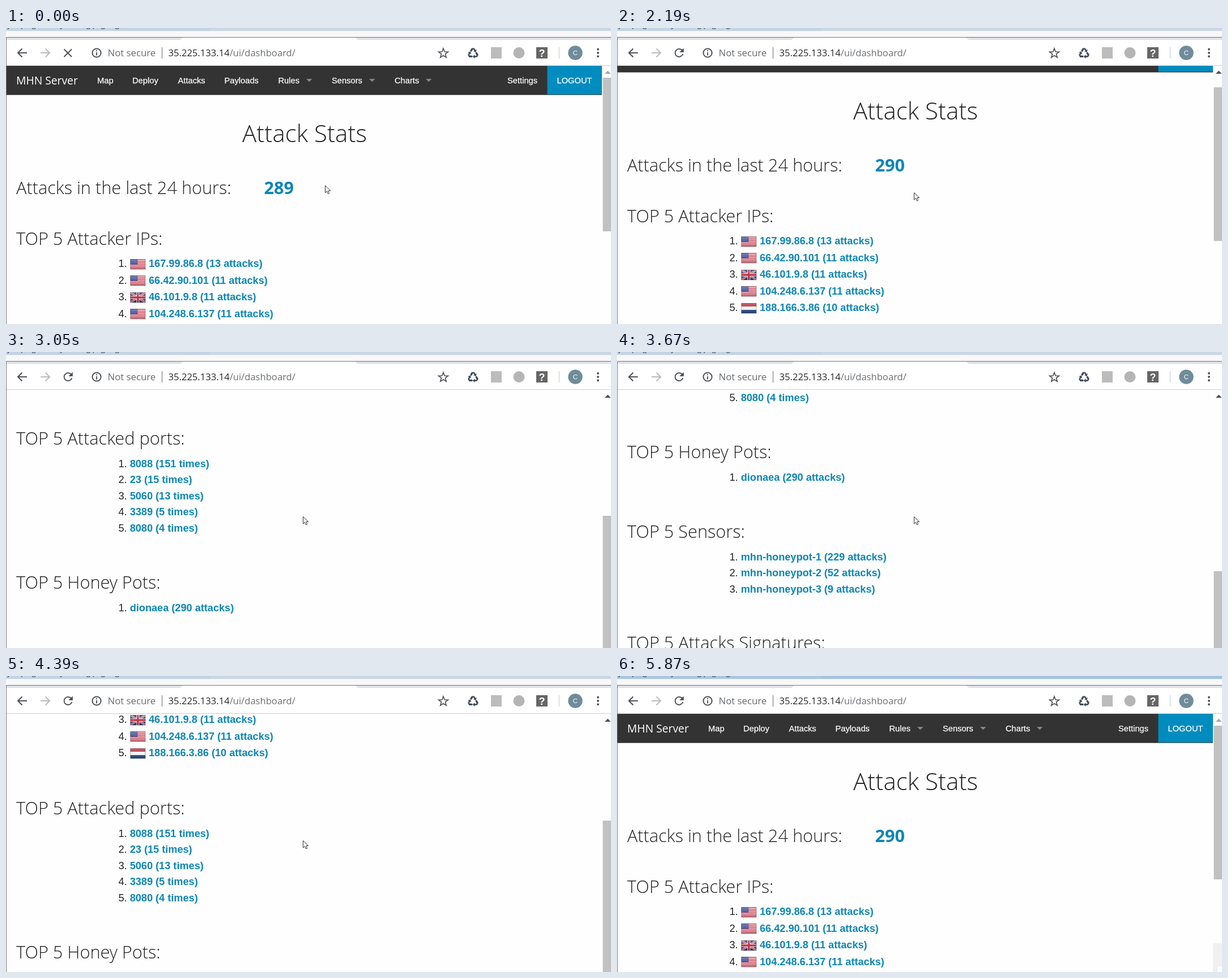
Animation, 1068 px wide and 524 px high, one loop 5.94 s. Source, as an HTML page:

```html
<!DOCTYPE html>
<html lang="en">
<head>
<meta charset="utf-8">
<title>Attack Stats</title>
<style>
  html, body { margin: 0; width: 100%; height: 100%; overflow: hidden; background: #fff; }
  svg { display: block; }
  text { white-space: pre; }
  .sans { font-family: "Liberation Sans", Arial, sans-serif; }
  .open { font-family: "Open Sans", "Noto Sans", sans-serif; }
  .nav { font-size: 14.7px; fill: #fff; stroke: #fff; stroke-width: .25; }
  .heading { font-size: 30.7px; font-weight: 300; fill: #222; }
  .item { font-size: 18.15px; fill: #222; }
  .link { font-weight: 700; fill: #0c86b6; }
  .line { fill: none; stroke: #4d5156; stroke-width: 2; }
</style>
</head>
<body>
<svg width="1068" height="524" viewBox="0 0 1068 524">
  <defs>
    <clipPath id="view"><rect x="1" y="67" width="1067" height="457"/></clipPath>
    <clipPath id="flagBox"><rect width="27" height="18"/></clipPath>
    <linearGradient id="gloss" x2="0" y2="1">
      <stop offset="0" stop-color="#fff" stop-opacity=".25"/>
      <stop offset=".5" stop-color="#fff" stop-opacity=".05"/>
      <stop offset="1" stop-color="#000" stop-opacity=".15"/>
    </linearGradient>
    <g id="us">
      <path d="M0 0H27V18H0Z" fill="#f3e2e4"/>
      <path d="M0 1.3H27M0 4.1H27M0 6.9H27M0 9.7H27M0 12.5H27M0 15.3H27M0 17.6H27" stroke="#d23c50" stroke-width="1.6"/>
      <path d="M0 0H13V9.5H0Z" fill="#334a94"/>
      <path d="M1.5 2.3H12M2.5 4.7H12M1.5 7.1H12" stroke="#a3afd6" stroke-width=".8" stroke-dasharray="1 1.4"/>
    </g>
    <g id="gb">
      <path d="M0 0H27V18H0Z" fill="#22346f"/>
      <path d="M0 0L27 18M27 0L0 18" stroke="#e6e6ee" stroke-width="3.2"/>
      <path d="M0 0L27 18M27 0L0 18" stroke="#c52f42" stroke-width="1.4"/>
      <path d="M13.5 0V18M0 9H27" stroke="#eeeef2" stroke-width="5.4"/>
      <path d="M13.5 0V18M0 9H27" stroke="#c52739" stroke-width="3.4"/>
    </g>
    <g id="nl">
      <path d="M0 0H27V6H0Z" fill="#b5303f"/>
      <path d="M0 6H27V12H0Z" fill="#f5f5f6"/>
      <path d="M0 12H27V18H0Z" fill="#284885"/>
    </g>
  </defs>

  <rect width="1068" height="524" fill="#fefefe"/>

  <g id="page" clip-path="url(#view)">
    <g id="content">
      <path d="M1 60H1052V118H1Z" fill="#333"/>
      <path d="M955.5 60H1052V118H955.5Z" fill="#008cbe"/>
      <path d="M1 118H1052" stroke="#222"/>
      <path d="M530 90h10.500l-5.250 5.500ZM641 90h10.500l-5.250 5.500ZM741 90h10.500l-5.250 5.500Z" fill="#858585"/>
      <text class="open" x="18" y="99.500" font-size="19.3" fill="#fff">MHN Server</text>
      <text class="open" x="417" y="201.500" font-size="42.1" font-weight="300" fill="#222">Attack Stats</text>
      <text class="open" id="count" x="455.500" y="294" font-size="30.7" font-weight="700" fill="#0c86b6"></text>
    </g>
    <g id="track" fill="#f0f0f0">
      <rect id="earlyTrack" x="1052" y="272" width="16" height="135"/>
      <path id="lateTrack" d="M1052 473H1068V514H1060V524H1052Z"/>
    </g>
    <rect id="thumb" x="1053.500" width="14.500" height="272" fill="#c1c1c1"/>
    <path id="upArrow" d="M1057 81L1062.300 75.500L1067.600 81Z"/>
  </g>

  <g id="chrome">
    <rect id="titleBar" width="1068" height="5.500"/>
    <rect id="titleTint" width="361" height="5.500" fill="#bcd2e8" opacity=".5"/>
    <text class="open" x="3" y="-1.500" font-size="13" fill="#333">jumping into my routing page again</text>
    <rect y="5.500" width="1068" height="10.500" fill="#f8f8f8"/>
    <rect y="17" width="1068" height="4" fill="#dee1e6"/>
    <path d="M306 21Q311 20 312 17H617Q618 20 623 21Z" fill="#fff"/>
    <rect x="1" y="21" width="1067" height="46" fill="#fff"/>
    <path d="M0 66.500H1068" stroke="#cfcfcf"/>
    <path d="M0 16.500H1068M.5 16V524" stroke="#77777b" fill="none"/>

    <path class="line" d="M37 44H22M28.500 36.500L21 44L28.500 51.500"/>
    <path class="line" style="stroke:#b8babd" d="M61 44H76M69.500 36.500L77 44L69.500 51.500"/>
    <path class="line" id="stop" d="M102.500 37.500L116 51M116 37.500L102.500 51"/>
    <g id="reload">
      <path class="line" d="M115 39.500A7 7 0 1 0 116.300 46"/>
      <path d="M117.800 35.500V43H110.300Z" fill="#4d5156"/>
    </g>
    <circle class="line" cx="160" cy="44" r="7.600"/>
    <path d="M160 39.300V41.300M160 43V48.500" stroke="#4d5156" stroke-width="1.900"/>
    <text class="open" x="179.500" y="50" font-size="16.8" fill="#666a6e">Not secure</text>
    <path d="M275.500 34V54" stroke="#85888c" stroke-width="1.300"/>
    <text class="open" x="286.500" y="50" font-size="16.6" fill="#26282a">35.225.133.14<tspan fill="#6b6f73">/ui/dashboard/</tspan></text>

    <path id="star" class="line" style="stroke-width:1.700"/>
    <g id="recycle"></g>
    <rect x="856" y="34" width="19" height="20" fill="#bcbcbc"/>
    <circle cx="905.500" cy="44" r="10" fill="#b5b5b5"/>
    <rect x="936" y="34" width="20" height="20" fill="#666"/>
    <text class="sans" x="946" y="50.500" text-anchor="middle" font-size="18" font-weight="700" fill="#fff">?</text>
    <path d="M976.500 34V54" stroke="#c9d5e6" stroke-width="1.300"/>
    <circle cx="1005" cy="44" r="12.700" fill="#6f8c9a"/>
    <text class="sans" x="1005" y="48" text-anchor="middle" font-size="11.500" fill="#fff">C</text>
    <path d="M1045 37.800h0M1045 44h0M1045 50.200h0" stroke="#4d5156" stroke-width="4" stroke-linecap="round"/>
  </g>

  <path id="cursor" d="M.5.5V13.200L3.500 10.400L5.500 15L7.700 14L5.700 9.600H9.800Z" fill="#fff" stroke="#2e2e38" stroke-linejoin="round"/>
</svg>
<script>
const LOOP = 5940;
const $ = id => document.getElementById(id);

function add(parent, tag, attributes, text = "") {
  const node = document.createElementNS("http://www.w3.org/2000/svg", tag);
  for (const [name, value] of Object.entries(attributes)) node.setAttribute(name, value);
  node.textContent = text;
  return parent.appendChild(node);
}

const content = $("content");
const write = (kind, x, y, text) => add(content, "text", { class: kind, x, y }, text);

[["Map", 161], ["Deploy", 223], ["Attacks", 303.5], ["Payloads", 385.5], ["Rules", 480.5],
 ["Sensors", 575], ["Charts", 686], ["Settings", 885], ["LOGOUT", 972.5]]
  .forEach(([label, x]) => write("sans nav", x, 97.5, label));

function addFlag(name, y) {
  const flag = add(content, "g", { transform: `translate(219.3 ${y})` });
  add(flag, "use", { href: "#" + name, "clip-path": "url(#flagBox)" });
  add(flag, "rect", { width: 27, height: 18, fill: "url(#gloss)" });
  add(flag, "rect", { x: .5, y: .5, width: 26, height: 17.5, fill: "none", stroke: "#444", "stroke-opacity": .4 });
}

function addList(title, y, items = [], flags = []) {
  write("open heading", 18, y, title);
  const pitch = flags.length ? 29.55 : 28.6;
  items.forEach((label, i) => {
    const baseline = y + 39.5 + i * pitch;
    write("sans item", 198.5, baseline, `${i + 1}.`);
    write("sans item link", flags[i] ? 252 : 218.7, baseline, label);
    if (flags[i]) addFlag(flags[i], Math.round(baseline - 14.5));
  });
}

write("open heading", 18, 294, "Attacks in the last 24 hours:");
addList("TOP 5 Attacker IPs:", 383.5,
  ["167.99.86.8 (13 attacks)", "66.42.90.101 (11 attacks)", "46.101.9.8 (11 attacks)",
   "104.248.6.137 (11 attacks)", "188.166.3.86 (10 attacks)"],
  ["us", "us", "gb", "us", "nl"]);
addList("TOP 5 Attacked ports:", 644,
  ["8088 (151 times)", "23 (15 times)", "5060 (13 times)", "3389 (5 times)", "8080 (4 times)"]);
addList("TOP 5 Honey Pots:", 899, ["dionaea (290 attacks)"]);
addList("TOP 5 Sensors:", 1040,
  ["mhn-honeypot-1 (229 attacks)", "mhn-honeypot-2 (52 attacks)", "mhn-honeypot-3 (9 attacks)"]);
addList("TOP 5 Attacks Signatures:", 1237);

const starPoints = Array.from({ length: 10 }, (_, i) => {
  const radius = i % 2 ? 3.7 : 8.8, angle = i * Math.PI / 5;
  return [772 + radius * Math.sin(angle), 45 - radius * Math.cos(angle)];
});
$("star").setAttribute("d", `M${starPoints.join("L")}Z`);

for (const angle of [0, 120, 240]) {
  add($("recycle"), "path", {
    transform: `translate(824.5 45) rotate(${angle})`,
    d: "M-5.5 -4.5L-2.5 -9.5H2L4.5 -6L6.3 -7L5.2 -2L.5 -3.7L2.2 -4.7L.3 -7.5L-2.7 -2.8Z",
    fill: "#414c5c"
  });
}

// Each step is [start time, ...values] and holds until the next one.
const scrollSteps = [
  [0, 0], [2190, 40], [2300, 150], [2420, 238], [2560, 252],
  [2720, 275], [2830, 370], [2940, 480], [3060, 590], [3170, 630],
  [3510, 650], [3670, 711], [3780, 745], [3900, 756],
  [4150, 665], [4270, 530], [4390, 399], [4510, 270], [4620, 145], [4730, 33], [4840, 0]
];
const cursorSteps = [
  [0, 563, 278.5], [1320, 545, 285], [1450, 528, 290], [1570, 524, 291],
  [4950, 570, 294], [5070, 722, 325], [5190, 880, 400], [5300, 990, 475],
  [5420, 1049, 511], [5650, 1080, 540]
];
const valueAt = (steps, time) => steps.findLast(([start]) => start <= time).slice(1);
const show = (id, visible) => $(id).setAttribute("visibility", visible ? "visible" : "hidden");

function draw() {
  const time = performance.now() % LOOP;
  const [scroll] = valueAt(scrollSteps, time);
  const active = time >= 5870;

  content.setAttribute("transform", `translate(0 ${-scroll})`);
  $("thumb").setAttribute("y", 88 + Math.round(scroll * .4215));
  $("upArrow").setAttribute("fill", scroll ? "#505050" : "#a8a8a8");
  $("count").textContent = time < 120 ? "289" : "290";
  $("cursor").setAttribute("transform", `translate(${valueAt(cursorSteps, time).join(" ")})`);
  $("titleBar").setAttribute("fill", active ? "#a3c2df" : "#c9d6e4");
  $("titleTint").setAttribute("opacity", active ? .2 : .5);

  show("stop", time < 620);
  show("reload", time >= 620);
  show("earlyTrack", time >= 120 && time < 2190);
  show("lateTrack", time >= 5300);
  requestAnimationFrame(draw);
}
draw();
</script>
</body>
</html>
```
